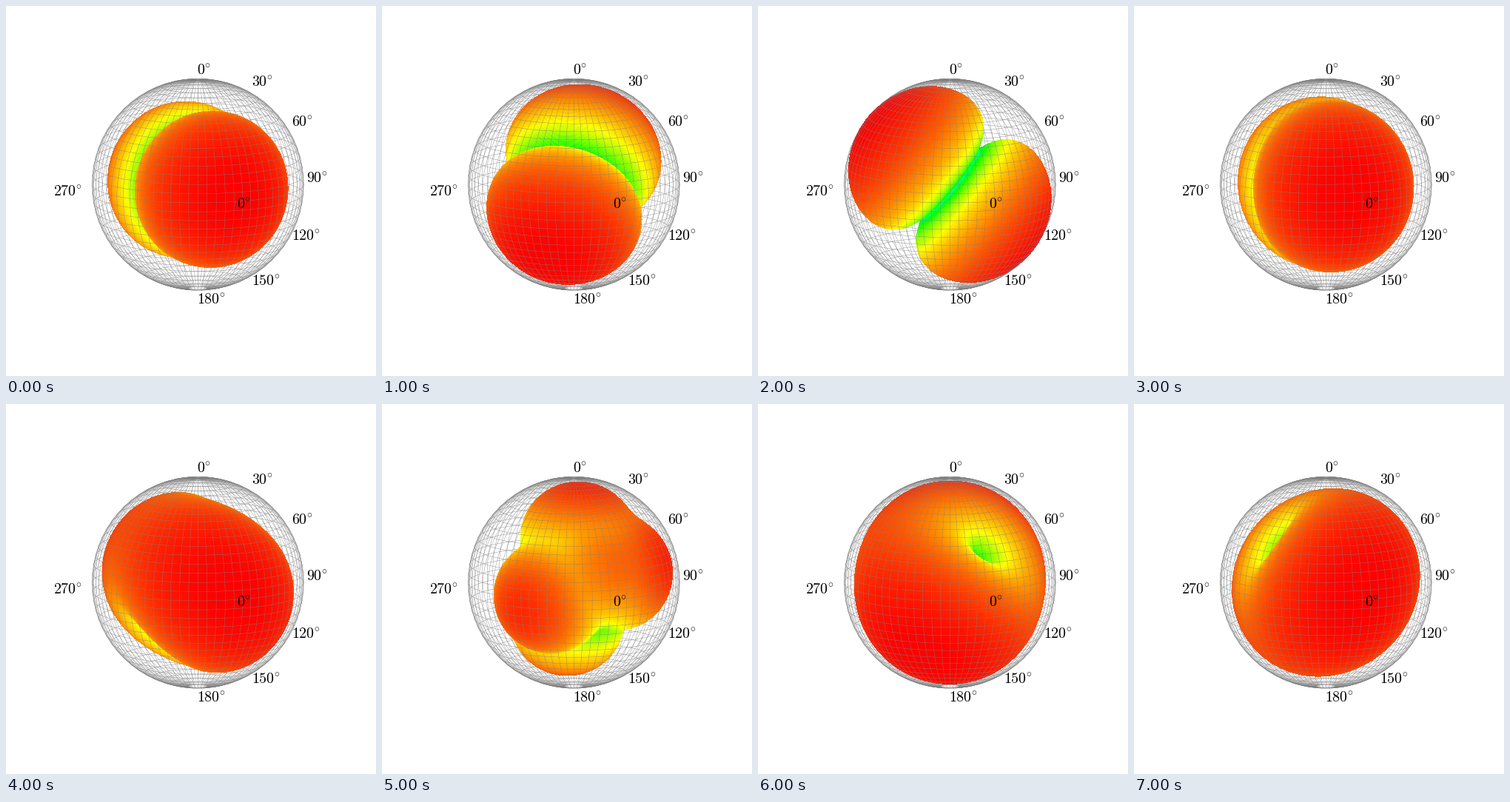
Write a matplotlib script that moves like this. It is 500 px wide and 500 px high and loops after 8000 ms.

```python
import numpy as np
import matplotlib.pyplot as plt
from matplotlib.animation import FuncAnimation
from matplotlib.collections import LineCollection, PolyCollection
from matplotlib.colors import LinearSegmentedColormap

plt.rcParams["mathtext.fontset"] = "cm"

SIZE, DPI = 500, 100
CX, CY, RADIUS = 259.3, 241.2, 143
AZ, EL = np.radians([20, 10])

# Rows give screen right, screen down and the direction to the viewer.
VIEW = np.array([
    [np.sin(AZ), np.cos(AZ), 0],
    [np.cos(AZ) * np.sin(EL), -np.sin(AZ) * np.sin(EL), -np.cos(EL)],
    [np.cos(AZ) * np.cos(EL), -np.sin(AZ) * np.cos(EL), np.sin(EL)],
])

CMAP = LinearSegmentedColormap.from_list("gain", [
    (0, "#0000ff"), (0.36, "#00ffff"), (0.47, "#00ff00"),
    (0.69, "#ffff00"), (1, "#ff0000")])


def unit(v):
    v = np.array(v, float)
    return v / np.linalg.norm(v)


def sphere(theta, phi):
    """Unit vectors for angles in degrees, in screen coordinates."""
    t, p = np.radians(theta), np.radians(phi)
    xyz = np.stack([np.sin(t) * np.cos(p), np.sin(t) * np.sin(p),
                    np.cos(t) + 0 * p], axis=-1)
    return xyz @ VIEW.T


def to_pixels(v):
    return v[..., :2] * RADIUS + (CX, CY)


def dipoles(main, side, k_side=0.45, k_null=0.0):
    """Power of up to three orthogonal dipoles on a 40 dB scale."""
    main = unit(main)
    side = unit(side - main * (main @ side))
    axes = np.stack([main, side, np.cross(main, side)], axis=1)

    def gain(d):
        power = (d @ axes) ** 2 @ np.array([1, k_side, k_null])
        return np.minimum(1, 1 + 0.25 * np.log10(power + 0.004))
    return gain


def single(axis):
    return dipoles(axis, UP, 0)


def lobes(peaks, slope=0.7, soft=0.05):
    """Smooth maximum of wide lobes, given as (height, axis)."""
    def gain(d):
        hills = [h - slope * (1 - d @ unit(axis)) for h, axis in peaks]
        return np.minimum(1, soft * np.log(np.exp(np.array(hills) / soft).sum(axis=0)))
    return gain


UP = np.array([0, -1, 0])
A = unit((0.335, 0.12, 0.934))
B = unit((-0.24, 0.71, 0.66))
C = unit((0.77, 0.63, -0.14))

PATTERNS = [
    single(A), single(B), single(C),
    dipoles((0.22, 0.09, 0.97), UP, 0.16, 0.055),
    dipoles(A, C),
    lobes([(0.96, (0.1, -0.97, 0.2)), (0.96, (0.92, -0.22, 0.3)),
           (0.95, (-0.52, 0.3, 0.8)), (0.95, (-0.15, 0.82, -0.55)),
           (0.87, (0.45, -0.2, 0.87))]),
    dipoles(B, C),
    dipoles(A, B),
]

MESH = sphere(np.linspace(0, 180, 91)[:, None], np.linspace(0, 360, 181)[None, :])


def corners(a):
    return np.stack([a[:-1, :-1], a[1:, :-1], a[1:, 1:], a[:-1, 1:]], axis=2)


def surface(gain):
    """Pixel quads sorted from back to front, with their colours."""
    r = gain(MESH)
    quads = corners(MESH * r[..., None]).reshape(-1, 4, 3)
    value = corners(r).reshape(-1, 4).mean(axis=1)
    order = np.argsort(quads[:, :, 2].mean(axis=1))
    return to_pixels(quads[order]), CMAP(value[order])


def grid_segments():
    theta, phi = np.arange(0, 176, 5), np.arange(0, 361, 5)
    g = sphere(theta[:, None], phi[None, :])
    along = np.stack([g[:, :-1], g[:, 1:]], axis=2).reshape(-1, 2, 3)
    down = np.stack([g[:-1, :-1], g[1:, :-1]], axis=2).reshape(-1, 2, 3)
    return np.concatenate([along, down])


fig = plt.figure(figsize=(SIZE / DPI, SIZE / DPI), dpi=DPI, facecolor="white")
ax = fig.add_axes([0, 0, 1, 1])
ax.set_xlim(0, SIZE)
ax.set_ylim(SIZE, 0)
ax.axis("off")

segments = grid_segments()
front = segments[:, :, 2].mean(axis=1) > 0
for mask, z in ((~front, 1), (front, 3)):
    grid = LineCollection(to_pixels(segments[mask]), colors="0.5",
                          linewidths=0.28, zorder=z)
    grid.set_snap(False)
    ax.add_collection(grid, autolim=False)

blob = PolyCollection([], antialiaseds=False, linewidths=0.3, zorder=2)
ax.add_collection(blob, autolim=False)


def label(deg, theta, phi, dx=-1, ha="left"):
    x, y = to_pixels(1.1 * sphere(theta, phi))
    ax.text(x + dx, y + 6.5, rf"${deg}^{{\circ}}$", fontsize=14.4, ha=ha,
            va="baseline", color="black", zorder=4)


for deg in range(0, 181, 30):
    label(deg, deg, 90)
label(0, 90, 0)
label(270, 90, 270, -8, "right")

SHAPES = [surface(p) for p in PATTERNS]


def update(i):
    quads, colors = SHAPES[i]
    blob.set_verts(quads)
    blob.set_facecolor(colors)
    blob.set_edgecolor(colors)
    return blob,


anim = FuncAnimation(fig, update, frames=len(PATTERNS), interval=1000,
                     init_func=lambda: update(0), repeat=True,
                     repeat_delay=0, blit=False)
plt.show()
```
